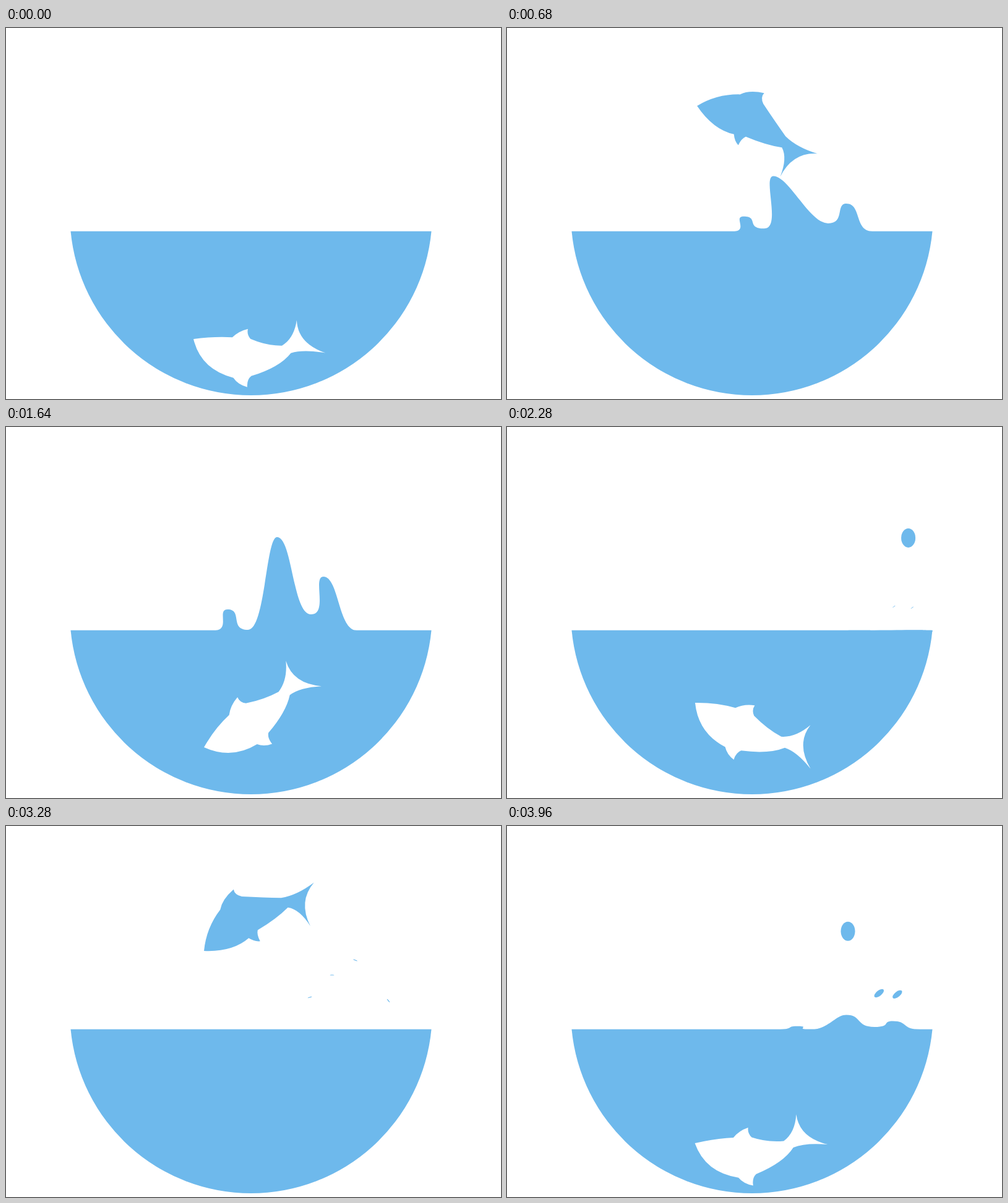
These frames come from a looping animation (800 px wide and 600 px high, 4 s). An HTML page:

```html
<!DOCTYPE html>
<html lang="en">
<head>
<meta charset="utf-8">
<title>Leaping fish</title>
<style>
  html, body { margin: 0; width: 100%; height: 100%; overflow: hidden; background: #fff; }
  svg { display: block; width: 100vw; height: 100vh; fill: #6eb9ec; }
</style>
</head>
<body>
<svg id="stage" viewBox="0 0 800 600">
  <defs>
    <path id="bowlShape" d="M104.5 328.7A292.8 292.8 0 0 0 687.5 328.7Z"/>
    <clipPath id="inBowl"><use href="#bowlShape"/></clipPath>
    <clipPath id="aboveBowl"><path d="M104.5 0H687.5V332H104.5Z"/></clipPath>
  </defs>
  <path id="fishAir"/>
  <use href="#bowlShape"/>
  <g id="waves" clip-path="url(#aboveBowl)"></g>
  <g id="drops"></g>
  <path id="fishWater" fill="#fff" clip-path="url(#inBowl)"/>
</svg>
<script>
const LOOP = 4000, JUMP = 2000, SURFACE = 329, GRAVITY = .00094;
const $ = id => document.getElementById(id);
const clamp = v => Math.max(0, Math.min(1, v));
const smooth = v => { v = clamp(v); return v * v * (3 - 2 * v); };
const add = (parent, tag) =>
  parent.appendChild(document.createElementNS(parent.namespaceURI, tag));

// Straight fish: nose at the origin, back upwards, tail to the right.
const FISH = `M0 0 Q30 -20 62 -27 Q72 -39 91 -44 Q89 -35 97 -28 Q126 -15 152 -10
  Q176 -14 197 -38 Q178 -4 207 32 Q182 8 162 6 Q140 23 99 32
  Q93 38 94 50 Q82 47 75 37 Q30 38 0 0Z`;

// Key moments of a jump: nose position, heading (rad), curvature (rad per 1000 px).
const MOTION = [
  { t: 0,    x: 303, y: 503, heading: .571,  bend: -5.7 },
  { t: 120,  x: 303, y: 474, heading: .76,   bend: -4.5 },
  { t: 280,  x: 304, y: 446, heading: .623,  bend: -2.4 },
  { t: 640,  x: 307, y: 133, heading: -.005, bend: 6.1 },
  { t: 880,  x: 308, y: 108, heading: -.4,   bend: 6.1 },
  { t: 1280, x: 320, y: 202, heading: -1.007, bend: 6.1 },
  { t: 1640, x: 320, y: 518, heading: -.43,  bend: -1.9 },
  { t: 1800, x: 312, y: 545, heading: -.1,   bend: -4 }
];

// Cyclic key, so that the curve runs on smoothly from jump to jump.
function key(i) {
  const n = MOTION.length, k = MOTION[(i + n) % n];
  return { ...k, t: k.t + JUMP * Math.floor(i / n) };
}

function slope(i, name) {
  const a = key(i), b = key(i + 1);
  return (b[name] - a[name]) / (b.t - a.t);
}

// Speed at a key: level at turning points, else the harmonic mean of both sides.
function speed(i, name) {
  const p = slope(i - 1, name), q = slope(i, name);
  return p * q > 0 ? 2 * p * q / (p + q) : 0;
}

function motion(name, t) {
  const i = MOTION.filter(k => k.t <= t).length - 1, a = key(i), b = key(i + 1);
  const span = b.t - a.t, u = (t - a.t) / span, w = 1 - u;
  return a[name] + (b[name] - a[name]) * smooth(u) +
    span * u * w * (speed(i, name) * w - speed(i + 1, name) * u);
}

// Wraps the straight fish around an arc that starts at the nose.
function fishPath(t) {
  const [nx, ny, heading, bend] = ['x', 'y', 'heading', 'bend'].map(n => motion(n, t));
  const k = bend / 1000 || 1e-6;
  return FISH.replace(/(-?\d+) (-?\d+)/g, (_, x, y) => {
    const a = heading + k * x;
    const px = nx + (Math.sin(a) - Math.sin(heading)) / k - y * Math.sin(a);
    const py = ny + (Math.cos(heading) - Math.cos(a)) / k + y * Math.cos(a);
    return `${px.toFixed(2)} ${py.toFixed(2)}`;
  });
}

// Waves: crests and the valleys after them, as [x from the left foot, height].
const waves = [
  { from: 470, to: 1125, at: 660, x: 357, vx: .345, unit: 95.5,
    height: t => 128 * Math.pow(clamp(1 - (t - 560) / 565), 1.5) * smooth((t - 470) / 90),
    turns: [[18, 26], [52, 5], [66, 95.5], [155, 14], [184, 48], [227, 0]] },
  { from: 1460, to: 2500, at: 1640, x: 336, vx: .315, unit: 151,
    height: t => 151 * Math.pow(1 - (t - 1640) / 860, 4) * smooth((t - 1460) / 150),
    turns: [[22, 34], [55, 1], [102, 151], [157, 26], [177, 87], [231, 0]] }
];
for (const wave of waves) wave.el = add($('waves'), 'path');

// Drops: place and speed at one moment, then ballistic flight while thinning out.
const drops = [];
function splash(shared, spots) {
  for (const [x, y] of spots) drops.push({ ...shared, x, y, el: add($('drops'), 'ellipse') });
}
splash({ from: 820, to: 1340, fade: 400, at: 1280, vx: .2, vy: .12, rx: 9, ry: 4,
  tilt: x => (x - 525) * .55 }, [[491, 277], [527, 241], [564.5, 217], [618, 282.5]]);
splash({ from: 1690, to: 2420, fade: 140, at: 1960, vx: .305, vy: -.122, rx: 11.5, ry: 15.5,
  tilt: () => 0 }, [[551, 170.3]]);
splash({ from: 1750, to: 2310, fade: 350, at: 1960, vx: .075, vy: -.088, rx: 9.3, ry: 4.3,
  tilt: () => -38 }, [[601.3, 270.5], [630.8, 272.3]]);

// Time within the jump that has this effect on show, if any.
function localTime(t, effect) {
  const s = [t, t - JUMP].find(v => v >= effect.from && v < effect.to);
  effect.el.style.display = s === undefined ? 'none' : '';
  return s;
}

function drawWave(wave, t) {
  const s = localTime(t, wave);
  if (s === undefined) return;
  const dt = s - wave.at, left = wave.x + wave.vx * dt, scale = wave.height(s) / wave.unit;
  let x = left, y = SURFACE, d = `M${x} ${y}`;
  wave.turns.forEach(([dx, h], i) => {
    const rising = i % 2 === 0, [leave, arrive] = rising ? [28, 18] : [25, 30];
    const endX = left + dx + (rising ? .03 * dt : 0), endY = SURFACE - h * scale;
    d += `C${x + leave} ${y} ${endX - arrive} ${endY} ${endX} ${endY}`;
    [x, y] = [endX, endY];
  });
  wave.el.setAttribute('d', `${d}v2H${left}Z`);
}

function drawDrop(drop, t) {
  const s = localTime(t, drop);
  if (s === undefined) return;
  const dt = s - drop.at;
  const x = drop.x + drop.vx * dt, y = drop.y + drop.vy * dt + GRAVITY / 2 * dt * dt;
  const grow = smooth((s - drop.from) / 100), thin = clamp((drop.to - s) / drop.fade);
  drop.el.setAttribute('rx', drop.rx * grow * Math.sqrt(thin));
  drop.el.setAttribute('ry', drop.ry * grow * thin);
  drop.el.setAttribute('transform', `translate(${x} ${y}) rotate(${drop.tilt(drop.x)})`);
}

function draw(now) {
  const t = now % LOOP, d = fishPath(t % JUMP);
  $('fishAir').setAttribute('d', d);
  $('fishWater').setAttribute('d', d);
  waves.forEach(wave => drawWave(wave, t));
  drops.forEach(drop => drawDrop(drop, t));
}

let start;
function tick(now) {
  start ??= now;
  draw(Math.max(0, now - start));
  requestAnimationFrame(tick);
}
draw(0);
requestAnimationFrame(tick);
</script>
</body>
</html>
```
